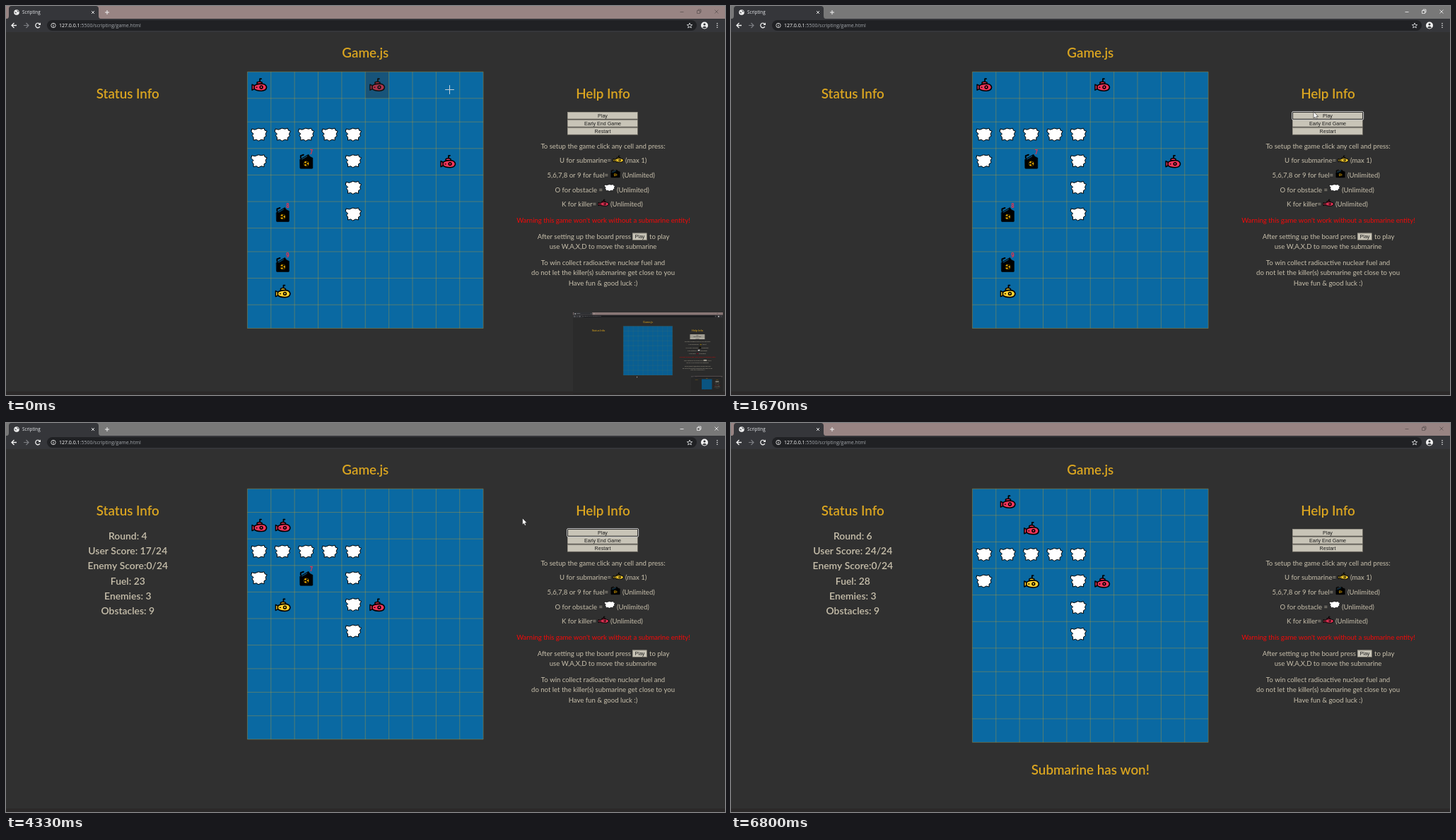
Write an HTML page with a canvas that moves like this. It is 1017 px wide and 551 px high and loops after 6940 ms.

```html
<!DOCTYPE html>
<html lang="en">
<head>
<meta charset="utf-8">
<title>Game.js</title>
<style>
html, body { margin: 0; width: 100%; height: 100%; overflow: hidden; background: #303030; }
canvas { display: block; }
</style>
</head>
<body>
<canvas id="stage" width="1017" height="551"></canvas>
<script>
const c = document.getElementById('stage').getContext('2d');
const LOOP = 6940, TICK = 200 / 3;
const GOLD = '#daa520', BEIGE = '#c8c0ac', RED = '#f0355a', YELLOW = '#ffd02e';
// The page is 1920 pixels wide, shown at this scale.
const ZOOM = 1017 / 1920;
const LEFT = 341.4, TOP = 93.2, CELL = 63 * ZOOM, FULL_ROW = 71 * ZOOM;

// Cells are written as row + column.
const OBSTACLES = ['20', '21', '22', '23', '24', '30', '34', '44', '54'];
const FUEL = { 71: 9, 51: 8, 32: 7 };
const ROUNDS = [
  { at: 0, sub: '81', killers: ['00', '05', '38'] },
  { at: 2670, sub: '71', killers: ['10', '14', '47'] },
  { at: 3270, sub: '61', killers: ['10', '13', '56'] },
  { at: 3800, sub: '51', killers: ['10', '12', '55'] },
  { at: 4330, sub: '41', killers: ['10', '11', '45'] },
  { at: 4670, sub: '31', killers: ['01', '12', '35'] },
  { at: 5130, sub: '32', killers: ['01', '12', '35'] }
];

const linear = p => p, easeIn = p => p * p, easeOut = p => p * (2 - p);
const smooth = p => p * p * (3 - 2 * p);
const POINTER = [
  [0, 627, 118], [730, 825, 150, easeOut], [1470, 825, 150], [1530, 824, 150],
  [2000, 824, 150], [2330, 729, 135, smooth], [3200, 729, 135], [3270, 730.5, 135],
  [5470, 730.5, 135], [6200, 235, 485, easeIn], [6270, 128, 541], [6330, 60, 600], [LOOP, 60, 600]
];

function text(s, x, y, size, color, align = 'center', font = 'Lato', weight = 400) {
  c.font = `${weight} ${size}px ${font}, sans-serif`;
  c.textAlign = align;
  c.fillStyle = color;
  c.fillText(s, x, y);
}
const heading = (s, x, y) => text(s, x, y, 18.8, GOLD, 'center', 'Lato', 600);

function box(x, y, w, h, color) {
  c.fillStyle = color;
  c.fillRect(x, y, w, h);
}

function shape(path, fill, stroke, width = 1) {
  const p = new Path2D(path);
  if (fill) { c.fillStyle = fill; c.fill(p); }
  if (stroke) { c.strokeStyle = stroke; c.lineWidth = width; c.stroke(p); }
}

function dot(x, y, r, fill, stroke, width = 1) {
  c.beginPath();
  c.arc(x, y, r, 0, 7);
  if (fill) { c.fillStyle = fill; c.fill(); }
  if (stroke) { c.strokeStyle = stroke; c.lineWidth = width; c.stroke(); }
}

function at(x, y, draw, sx = 1, sy = sx) {
  c.save();
  c.translate(x, y);
  c.scale(sx, sy);
  c.lineJoin = c.lineCap = 'round';
  draw();
  c.restore();
}

const submarine = color => () => {
  shape('M1-6V-10H3', null, '#000', 1.7);
  shape('M-3-3V-5Q0-7 4-5V-3Z', color, '#000', 1.5);
  shape('M-6 0L-10-2V6L-6 4Z', color, '#000', 1.5);
  shape('M-7 0Q-4-3 3-3Q10-3 10.500 2Q10 7 3 7Q-4 7-7 4Z', color, '#000', 1.6);
  dot(3, 1.8, 1.9, color, '#000', 1.5);
  shape('M-4 2H-3', null, '#000', 1.3);
};

function obstacle() {
  shape('M-10-8L-6-7L-1-9L3-8L7-9L8-6L11-5L9-1L10 2L7 4L7 8L3 7L-1 9L-4 7L-8 8L-8 4L-10 1L-8-1L-11-4Z',
    '#fff', '#000', 1);
}

function fuelCan() {
  shape('M-9-3L3-10L5-7L9-5V9Q9 10 8 10H-8Q-9 10-9 9Z', '#000', '#000', 0.6);
  shape('M-8-5V-8L-4-9.500', null, '#000', 2);
  shape('M-6-3.400L1-7.400', null, '#0a69a2', 0.9);
  dot(0, 3, 3.5, '#e0a400');
  dot(0, 3, 0.9, '#000');
  for (let i = 0; i < 3; i++) {
    const a = i * Math.PI * 2 / 3 + 0.5;
    c.beginPath();
    c.moveTo(0, 3);
    c.arc(0, 3, 3.4, a, a + 1.05);
    c.fill();
  }
}

function arrow(x, y) {
  at(x, y, () => shape('M0 0V9L2 7.2L3.5 10.3L5 9.6L3.7 6.6H6.3Z', '#fff', '#222', 0.6));
}

function button(label, x, y, w, h) {
  box(x, y, w, h, '#716d64');
  box(x, y, w - 1, h - 1, '#9b978c');
  box(x + 1, y + 1, w - 2, h - 2, '#c8c4b7');
  text(label, x + w / 2, y + h / 2 + 2.6, 7.1, '#1c1c1c', 'center', 'Liberation Sans');
}

function browser(focused) {
  box(0, 0, 1017, 551, '#303030');
  box(0, 546, 1017, 5, '#2b2929');
  box(0, 0, 1017, 18, focused ? '#787878' : '#988483');
  shape('M1 18Q4 18 4 14V4Q4 0 8 0H127Q131 0 131 4V14Q131 18 134 18Z', '#35363a');
  box(0, 18, 1017, 19, '#35363a');
  dot(15, 9, 3.8, '#f1f1f1');
  shape('M12 8L15 9L14 11ZM15 6L18 7L17 9Z', '#55585c');
  text('Scripting', 23, 11.3, 6.3, '#e8eaed', 'left', 'Open Sans');
  shape('M121 7L125 11M125 7L121 11', null, '#f1f1f1', 0.9);
  shape('M140 9H146M143 6V12', null, '#f1f1f1', 1);
  const tool = focused ? '#f4f4f4' : '#5f5554';
  shape('M953.500 8.500H958.500M1002.500 5.500L1007.500 10.500M1007.500 5.500L1002.500 10.500' +
    'M977.500 6.500H981.500V10.500H977.500ZM979 6.500V5H983V9H981.500', null, tool, 0.8);

  shape('M15 27.500H8M11.500 24L8 27.500L11.500 31', null, '#f1f1f1', 1.3);
  shape('M25 27.500H32M28.500 24L32 27.500L28.500 31', null, '#7c7e82', 1.2);
  c.beginPath();
  c.arc(45, 27.5, 3.2, 0.5, 5.5);
  c.strokeStyle = '#f1f1f1';
  c.lineWidth = 1.3;
  c.stroke();
  shape('M49 23.500V27H45.500Z', '#f1f1f1');

  c.beginPath();
  c.roundRect(58, 20, 919, 15, 7.5);
  c.fillStyle = '#202124';
  c.fill();
  dot(67, 27.5, 3.2, null, '#e0e0e0', 0.9);
  box(66.5, 27, 1, 2.5, '#e0e0e0');
  box(66.5, 25.3, 1, 1, '#e0e0e0');
  const host = '127.0.0.1';
  text(host, 75, 30, 7, '#fff', 'left', 'Open Sans');
  text(':5500/scripting/game.html', 75 + c.measureText(host).width, 30, 7, '#a2a6ab', 'left', 'Open Sans');
  shape('M967 24L968 26.600L970.700 26.700L968.600 28.400L969.300 31L967 29.500L964.700 31L965.400 28.400L963.300 26.700L966 26.600Z',
    null, '#e8eaed', 0.8);
  dot(988, 27.5, 5, '#f1f1f1');
  dot(988, 26, 1.6, '#35363a');
  shape('M985 30.500Q988 27 991 30.500Q988 32.500 985 30.500Z', '#35363a');
  for (const y of [24.7, 27.5, 30.3]) dot(1006, y, 0.8, '#f1f1f1');
}

function help(ring) {
  heading('Help Info', 844.5, 130.5);
  ['Play', 'Early End Game', 'Restart'].forEach((s, i) => button(s, 794, 150 + 11.1 * i, 100, 10.6));
  if (ring) {
    c.strokeStyle = '#101010';
    c.lineWidth = 1;
    c.strokeRect(794.4, 150.4, 99.4, 10);
    c.beginPath();
    c.roundRect(793.6, 149.6, 101, 11.6, 1.5);
    c.strokeStyle = '#fff';
    c.lineWidth = 0.8;
    c.stroke();
  }

  const line = (s, x, y, align, color = BEIGE) => text(s, x, y, 9.55, color, align);
  const entry = (label, x, y, note, draw, iconY) => {
    line(label, x, y, 'right');
    line(note, x + 20, y, 'left');
    at(x + 10, iconY, draw, 0.7, 0.54);
  };
  line('To setup the game click any cell and press:', 844.5, 201.5);
  entry('U for submarine=', 856, 222.2, '(max 1)', submarine(YELLOW), 217.5);
  entry('5,6,7,8 or 9 for fuel=', 852, 243, '(Unlimited)', fuelCan, 237.5);
  entry('O for obstacle =', 844, 263.6, '(Unlimited)', obstacle, 257.5);
  entry('K for killer=', 835, 284.3, '(Unlimited)', submarine(RED), 279.5);
  line("Warning this game won't work without a submarine entity!", 845, 307, 'center', '#f50808');
  line('After setting up the board press', 884, 330, 'right');
  button('Play', 886, 321.5, 21, 10.5);
  line('to play', 910, 330, 'left');
  line('use W,A,X,D to move the submarine', 844.5, 344.2);
  line('To win collect radioactive nuclear fuel and', 844.5, 367);
  line('do not let the killer(s) submarine get close to you', 844.5, 381.3);
  line('Have fun & good luck :)', 844.5, 395.6);
}

function board(sprites, shade) {
  const rows = [TOP];
  for (let r = 0; r < 10; r++) {
    const full = sprites.some(s => +s.cell[0] === r);
    rows.push(rows[r] + (full ? FULL_ROW : CELL));
  }
  const right = LEFT + CELL * 10, bottom = rows[10];
  box(LEFT, TOP, right - LEFT, bottom - TOP, '#0a69a2');

  for (const { cell, draw, dy, label } of sprites) {
    const x = LEFT + CELL * (+cell[1] + 0.5), y = rows[cell[0]];
    at(x, y + dy, draw);
    if (label) text(label, x + 7, y + 8.5, 8, '#f0304a', 'center', 'DejaVu Sans Mono', 700);
  }
  if (shade > 0) box(LEFT + CELL * 5, TOP, CELL, rows[1] - TOP, `rgba(48,48,48,${shade})`);

  c.beginPath();
  for (let i = 0; i <= 10; i++) {
    const x = LEFT + CELL * i, y = rows[i];
    c.moveTo(x, TOP);
    c.lineTo(x, bottom);
    c.moveTo(LEFT, y);
    c.lineTo(right, y);
  }
  c.strokeStyle = 'rgba(218,165,32,.65)';
  c.lineWidth = ZOOM;
  c.stroke();
  return bottom;
}

function page(sprites, focused, ring, shade) {
  browser(focused);
  heading('Game.js', 508.3, 72.5);
  heading('Status Info', 172.3, 130.5);
  help(ring);
  return board(sprites, shade);
}

// A small shot of the empty page, holding an even smaller one.
function thumbnail(depth) {
  at(802, 434, () => {
    page([], false, false, 0);
    if (depth > 1) thumbnail(depth - 1);
    arrow(432, 434);
    box(0, 0, 1017, 551, 'rgba(0,0,0,.1)');
  }, 0.2085);
}

function pointer(t, bottom) {
  const i = POINTER.findIndex(k => k[0] > t);
  const [t0, x0, y0] = POINTER[i - 1], [t1, x1, y1, ease = linear] = POINTER[i];
  const p = ease((t - t0) / (t1 - t0));
  const x = x0 + (x1 - x0) * p, y = y0 + (y1 - y0) * p;
  const onBoard = x > LEFT && x < LEFT + CELL * 10 && y > TOP && y < bottom;
  if (onBoard) at(Math.floor(x) + 0.5, Math.floor(y) + 0.5, () => shape('M-6 0H6M0-6V6', null, '#c3d0d8', 1));
  else arrow(x, y);
}

function render(now) {
  const tick = Math.floor((now % LOOP) / TICK + 0.08);
  const t = Math.min(Math.round(tick * TICK / 10) * 10, LOOP - 10);
  const round = ROUNDS.findLastIndex(r => t >= r.at);
  const { sub, killers } = ROUNDS[round];
  const visited = ROUNDS.slice(0, round + 1).map(r => r.sub);
  const score = visited.reduce((sum, cell) => sum + (FUEL[cell] || 0), 0);

  const sprites = [
    ...OBSTACLES.map(cell => ({ cell, draw: obstacle, dy: 18 })),
    ...Object.keys(FUEL).filter(cell => !visited.includes(cell))
      .map(cell => ({ cell, draw: fuelCan, dy: 18.5, label: FUEL[cell] })),
    ...killers.map(cell => ({ cell, draw: submarine(RED), dy: 20 })),
    { cell: sub, draw: submarine(YELLOW), dy: 20 }
  ];
  const bottom = page(sprites, t >= 800 && t < 6800, t >= 1670 && t < 6800, 0.35 * (1 - t / 600));

  if (t >= 1870) {
    [`Round: ${round}`, `User Score: ${score}/24`, 'Enemy Score:0/24',
      `Fuel: ${10 + score - round}`, 'Enemies: 3', 'Obstacles: 9']
      .forEach((s, i) => text(s, 172.3, 165 + 21.2 * i, 13.9, BEIGE, 'center', 'Lato', 600));
  }
  if (t >= 5130) heading('Submarine has won!', 508.3, 497.5);

  const fade = Math.min(1, (860 - t) / 330);
  if (fade > 0) {
    // Fade by covering, so nested drawing stays opaque.
    thumbnail(2);
    box(802, 434, 213, 112, `rgba(48,48,48,${1 - fade})`);
  }
  pointer(t, bottom);
}

const start = performance.now();
(function loop() {
  render(performance.now() - start);
  requestAnimationFrame(loop);
})();
</script>
</body>
</html>
```
